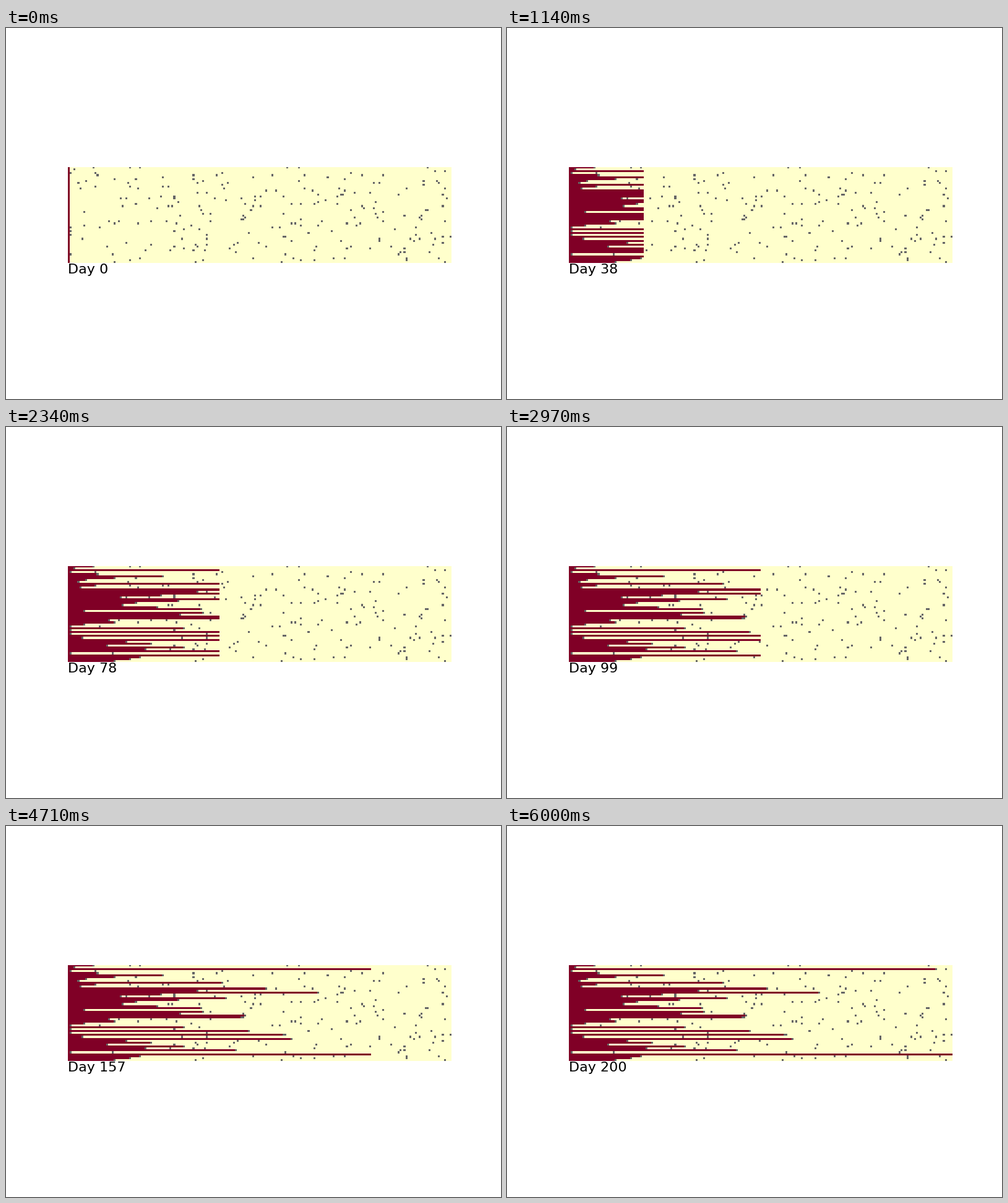
Recreate the animation shown at these times as a matplotlib script. Size 800x600 px, loop 6.03 s.

```python
import numpy as np
import matplotlib.pyplot as plt
from matplotlib.animation import FuncAnimation
from matplotlib.colors import ListedColormap

ROWS, COLS = 50, 200
DAYS = 201
WALL_RATE = 0.021
EMPTY, FILLED, WALL = 0, 1, 2

# First wall in each row, where the flow stops; COLS leaves the row open.
STOPS = np.array([
    13, 3, 191, 1, 15, 49, 24, 9, 5, 80, 14, 6, 103, 67, 130, 48, 27,
    82, 57, 35, 28, 46, 69, 8, 70, 58, 92, 90, 21, 24, 8, 1, 60, 1,
    94, 1, 112, 7, 116, 30, 43, 20, 60, 40, 87, 1, COLS, 37, 32, 24,
])[:, None]

columns = np.arange(COLS)
rng = np.random.default_rng(7)
scatter = rng.random((ROWS, COLS)) < WALL_RATE
walls = (columns == STOPS) | (scatter & (columns > STOPS))


def state(day):
    grid = np.where(columns < np.minimum(STOPS, day + 1), FILLED, EMPTY)
    grid[walls] = WALL
    return grid


fig, ax = plt.subplots(figsize=(8, 6), dpi=100)
ax.axis("off")
cmap = ListedColormap(["#ffffcc", "#800026", "#666666"])
image = ax.imshow(state(0), cmap=cmap, vmin=EMPTY, vmax=WALL,
                  interpolation="nearest")
label = ax.text(0, -0.005, "Day 0", transform=ax.transAxes, va="top",
                fontsize=16, family="DejaVu Sans")


def update(day):
    image.set_data(state(day))
    label.set_text(f"Day {day}")
    return image, label


anim = FuncAnimation(fig, update, frames=DAYS, interval=30,
                     repeat=True, repeat_delay=0)
plt.show()
```
